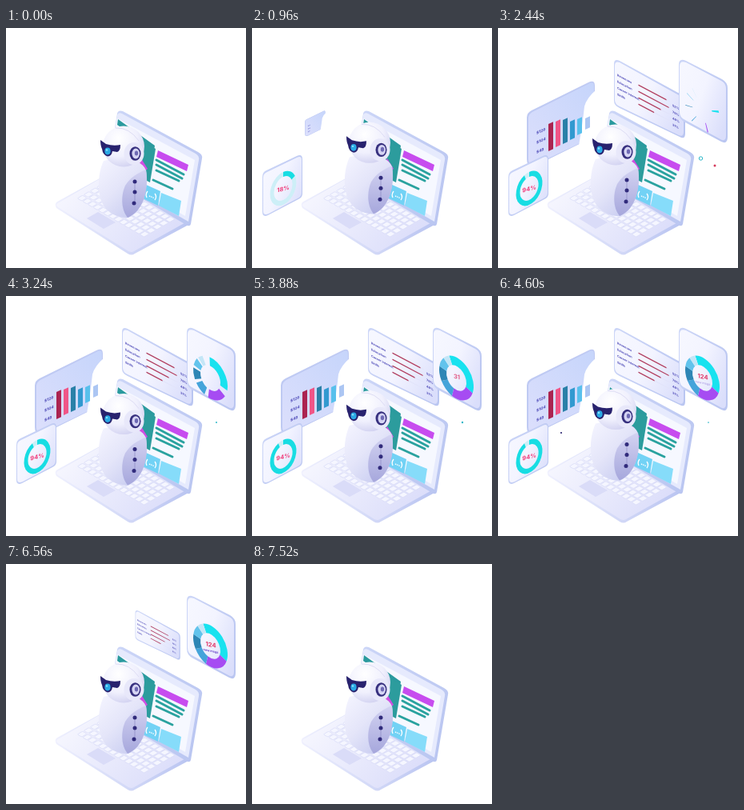
These frames come from a looping animation (300x300 px, 7.84 s). An HTML page:

```html
<!DOCTYPE html>
<html lang="en">
<head>
<meta charset="utf-8">
<title>Robot dashboard</title>
<style>
html, body { margin: 0; width: 100%; height: 100%; overflow: hidden; background: #fff; }
svg { display: block; width: 100vw; height: 100vh; }
text { font-family: Inter, "Open Sans", sans-serif; font-weight: 700; }
</style>
</head>
<body>
<svg viewBox="0 0 300 300" xmlns="http://www.w3.org/2000/svg">
  <defs>
    <linearGradient id="card" x1="0" y1=".2" x2="1" y2=".8">
      <stop offset="0" stop-color="#f6f7ff"/><stop offset=".45" stop-color="#f3f4ff"/><stop offset="1" stop-color="#dadefb"/>
    </linearGradient>
    <linearGradient id="edge" x1="0" y1=".2" x2="1" y2=".8">
      <stop offset="0" stop-color="#cbd5f7"/><stop offset="1" stop-color="#bac6f1"/>
    </linearGradient>
    <linearGradient id="blueCard" x1="0" y1="1" x2="1" y2="0">
      <stop offset="0" stop-color="#dcdffc"/><stop offset="1" stop-color="#c6d5fb"/>
    </linearGradient>
    <linearGradient id="base" x1="0" y1="0" x2="1" y2=".5">
      <stop offset="0" stop-color="#fafaff"/><stop offset="1" stop-color="#dcdefa"/>
    </linearGradient>
    <linearGradient id="under" x1="0" y1="0" x2="1" y2="0">
      <stop offset="0" stop-color="#eff0fe"/><stop offset="1" stop-color="#b9c4f1"/>
    </linearGradient>
    <linearGradient id="body" x1="0" y1="0" x2=".8" y2="1">
      <stop offset="0" stop-color="#f5f5ff"/><stop offset=".5" stop-color="#e4e5f9"/><stop offset="1" stop-color="#c6caf0"/>
    </linearGradient>
    <linearGradient id="wing" x1="0" y1="0" x2="0" y2="1">
      <stop offset="0" stop-color="#d3d3f2"/><stop offset="1" stop-color="#a6a7dc"/>
    </linearGradient>
    <radialGradient id="head" cx=".38" cy=".3" r=".75">
      <stop offset="0" stop-color="#fff"/><stop offset=".6" stop-color="#f0f0fd"/><stop offset="1" stop-color="#d0d0f0"/>
    </radialGradient>
  </defs>

  <g id="laptop">
    <path d="M62 222Q61 218 66 216L130 181L230 240V245L161 282Q157 285 152 282L66 227Q62 225 62 222Z" fill="url(#under)"/>
    <path d="M65 219L130 181L230 240L160 279Q157 281 153 279L65 224Q61 221 65 219Z" fill="url(#base)"/>
    <g id="keys" transform="matrix(6.5 3.75 8 -4.6 88 213)"/>
    <path d="M101 238L115 230L137 243L122 251Z" fill="#dadcf8"/>
    <path d="M139 107Q140 102 146 104L240 155Q246 158 245 163L231 245Q230 249 225 246L126 187Z" fill="url(#edge)"/>
    <path d="M139 109Q140 105 145 107L237 157Q242 160 241 165L228 242L126 184Z" fill="#e6eafd"/>
    <path d="M139 113L236 165L224 235L128 180Z" fill="#f6f8ff"/>
    <path d="M140 114L186 147L185 153L139 121Z" fill="#2a9a9e"/>
    <path d="M160 136L187 151L180 193L155 180Z" fill="#2c9c9d"/>
    <path d="M169 163L177 176L169 182L162 174Z" fill="#cf4ee2"/>
    <path d="M190 153L228 171L226 179L188 161Z" fill="#c74cef"/>
    <path d="M188 165L222 183M188 171L220 188M188 178L216 191M184 190L208 201" stroke="#2aa29f" stroke-width="3" stroke-linecap="round"/>
    <path d="M173 195L193 204L190 222L169 212Z" fill="#72d2f5"/>
    <path d="M194 206L219 216L216 235L191 222Z" fill="#86dcfa"/>
    <path d="M177 204Q174 208 176 212M186 207Q189 211 186 215" fill="none" stroke="#fff" stroke-width="1.3"/>
    <path d="M179 210L185 212.5" stroke="#fff" stroke-width="1.4" stroke-dasharray="1.4 1"/>
  </g>

  <g id="bars">
    <path d="M36 112Q36 106 42 103L113 68Q121 64 121 72V129Q121 136 114 139L49 171Q36 176 36 164Z" fill="#bfcaf3"/>
    <path d="M38 113Q38 108 43 105L113 70Q120 66 120 73V129Q120 135 115 138L50 169Q38 173 38 164Z" fill="url(#blueCard)"/>
    <path d="M123 77Q111 87 108 98Q106 118 101 147H123Z" fill="#fff"/>
    <g id="barShapes"/>
    <g font-size="4.8" fill="#4f4bb8">
      <text transform="matrix(1 -.45 0 1 48 133)">$126</text>
      <text transform="matrix(1 -.45 0 1 48 145)">$104</text>
      <text transform="matrix(1 -.45 0 1 48 157)">$48</text>
    </g>
  </g>

  <g id="list">
    <path d="M145 45Q145 38 152 41L227 82Q234 86 234 93V132Q234 140 227 136L152 100Q145 97 145 91Z" fill="url(#edge)"/>
    <path d="M146 47Q146 41 152 43L226 84Q232 87 232 93V129Q232 137 226 134L152 98Q146 95 146 90Z" fill="url(#card)"/>
    <g id="rows" font-size="3.8" fill="#4f4bb8"/>
  </g>

  <g id="gauge">
    <g id="gaugeCard">
      <path d="M13 186Q13 180 18 178L56 160Q63 157 63 164V207Q63 212 58 214L20 234Q13 237 13 230Z" fill="url(#edge)"/>
      <path d="M14 187Q14 182 19 180L56 162Q62 159 62 165V206Q62 211 57 213L21 232Q14 235 14 229Z" fill="url(#card)"/>
    </g>
    <g id="ring">
      <g transform="matrix(1 -.45 0 1.25 39 200.5)" fill="none" stroke-width="4.8">
        <circle r="14" stroke="#cdeff7"/>
        <path id="gaugeArc" stroke="#18dde3"/>
      </g>
      <text id="percent" transform="matrix(1 -.25 0 1 39 203.5)" text-anchor="middle" font-size="7.4" fill="#f03a78"/>
    </g>
  </g>

  <g id="pie">
    <path d="M226 46Q226 37 235 41L280 64Q287 68 287 75V136Q287 146 279 142L234 118Q226 114 226 106Z" fill="url(#edge)"/>
    <path d="M227 48Q227 40 235 43L279 66Q285 69 285 76V134Q285 143 278 139L234 115Q227 112 227 105Z" fill="url(#card)"/>
    <g id="slices" transform="matrix(1 .5 0 1.2 255.5 102.5)" fill="none" stroke-width="9"/>
    <g text-anchor="middle">
      <text id="count" transform="matrix(1 .18 0 1 256 103.5)" font-size="7.6" fill="#e03868"/>
      <text id="caption" transform="matrix(1 .2 0 1 256 110)" font-size="3.8" fill="#6a45c8">new msgs</text>
    </g>
  </g>

  <g id="robot">
    <path d="M122 166C114 183 114 207 121 220C128 233 142 238 153 237C170 229 178 207 175 178C170 164 146 160 122 166Z" fill="url(#body)"/>
    <path d="M175 177C179 201 172 229 152 237C143 226 144 208 149 197C155 187 165 181 175 177Z" fill="url(#wing)"/>
    <path d="M161 190V220" stroke="#8580bd" stroke-width=".6"/>
    <g fill="#312b7c"><circle cx="161" cy="192" r="2.5"/><circle cx="161" cy="205" r="2.5"/><circle cx="160" cy="219" r="2.5"/></g>
    <ellipse cx="147" cy="148" rx="26" ry="25.5" fill="url(#head)"/>
    <path d="M137 125Q154 124 166 141" fill="none" stroke="#dddcf4" stroke-width="1"/>
    <ellipse cx="160" cy="157" rx="12.5" ry="14" fill="#e8e8fa"/>
    <ellipse cx="161.5" cy="157" rx="7" ry="8.7" fill="#37307f"/>
    <ellipse cx="162.2" cy="157" rx="4.8" ry="6.4" fill="#d5d4f3"/>
    <ellipse cx="163" cy="156.5" rx="2.2" ry="3" fill="#6f6ab5"/>
    <path d="M118 140L125 145Q134 148 143 146Q143 154 139 155L133 154Q132 160 127 160.5Q121 159 120 151Q118 147 118 140Z" fill="#28226e"/>
    <ellipse cx="127" cy="154" rx="3.6" ry="4.4" fill="#2aa9e4"/>
    <circle cx="126" cy="152.5" r="1.2" fill="#8be3fa"/>
  </g>
  <g id="sparks"/>
</svg>
<script>
const LOOP = 7840;
const $ = id => document.getElementById(id);

function add(parent, tag, attrs, text) {
  const node = document.createElementNS('http://www.w3.org/2000/svg', tag);
  for (const key in attrs) node.setAttribute(key, attrs[key]);
  if (text) node.textContent = text;
  return parent.appendChild(node);
}

// Smooth 0..1 progress of t between two times.
function ease(t, from, to) {
  const p = Math.min(1, Math.max(0, (t - from) / (to - from)));
  return (1 - Math.cos(Math.PI * p)) / 2;
}

function arc(r, from, to) {
  const point = deg => {
    const a = deg * Math.PI / 180;
    return `${r * Math.cos(a)} ${r * Math.sin(a)}`;
  };
  return `M${point(from)}A${r} ${r} 0 ${to - from > 180 ? 1 : 0} 1 ${point(to)}`;
}

function zoom(id, cx, cy, s, dy = 0) {
  $(id).setAttribute('transform', `translate(${cx} ${cy + dy}) scale(${s}) translate(${-cx} ${-cy})`);
  $(id).setAttribute('visibility', s > 0.01 ? 'visible' : 'hidden');
}

for (let row = 0; row < 5; row++)
  for (let col = 0; col < 13; col++)
    add($('keys'), 'rect', { x: col + 0.08, y: row + 0.08, width: 0.84, height: 0.82, rx: 0.15, fill: '#f5f6ff', stroke: '#d9dbf7', 'stroke-width': 0.08 });

// x, top, bottom, colour
const bars = [
  [63, 120, 154, '#ab2350'], [72, 117, 149, '#f05587'], [81, 115, 145, '#2a80a8'],
  [90, 117, 140, '#3299d0'], [99, 114, 134, '#58c0ec'], [109, 113, 127, '#acc6f3']
].map(([x, top, bottom, fill]) => ({ x, top, bottom, node: add($('barShapes'), 'path', { fill }) }));

// label, baseline, fill length, value
const rows = [['Revenues', 60, 34, '52%'], ['Education', 68, 37, '76%'], ['Career interest', 76, 27, '48%'], ['Skills', 84, 19, '31%']]
  .map(([label, y, length, value]) => {
    const skew = (x, dy) => `matrix(1 .53 0 1 ${x} ${y + dy})`;
    add($('rows'), 'text', { transform: skew(149, 0) }, label);
    add($('rows'), 'text', { transform: skew(218, 38) }, value);
    const line = { transform: skew(176, 11.5), 'stroke-width': 1.4, 'stroke-linecap': 'round' };
    add($('rows'), 'path', { ...line, d: 'M0 0H38', stroke: '#e2e4fa' });
    return { length, node: add($('rows'), 'path', { ...line, stroke: '#b4405f' }) };
  });

// start angle, end angle, angle it grows from, colour
const slices = [
  [-115, 20, -17, '#18e2ef'], [20, 105, 72, '#a64cf2'], [105, 150, 128, '#45a4da'],
  [150, 190, 170, '#2e86b5'], [190, 222, 206, '#62c3ec'], [222, 245, 234, '#c3e6f7']
].map(([from, to, anchor, stroke]) => ({ from, to, anchor, node: add($('slices'), 'path', { stroke }) }));

// x, y, radius, colour, start, end
const sparks = [
  [245, 148, 1.4, '#b52645', 1400, 2000], [271, 172, 1.5, '#d63a5b', 2140, 2740],
  [263, 158, 1.2, '#2bb7c8', 2900, 4900], [79, 171, 1.1, '#28226e', 4350, 4900],
  [97, 161, 1.3, '#35b9c4', 5650, 6300], [79, 171, 1.5, '#c52d50', 5650, 6300],
  [77, 181, 1.1, '#c52d50', 5700, 6250], [97, 181, 1.4, '#275a96', 5650, 6300],
  [271, 172, 1.3, '#d63a5b', 6900, 7520], [103, 161, 1.2, '#35b9c4', 6900, 7480]
].map(([cx, cy, r, fill, start, end]) => ({ r, start, end, node: add($('sparks'), 'circle', { cx, cy, fill }) }));
const bubble = add($('sparks'), 'circle', { cx: 253.5, cy: 163, fill: 'none', stroke: '#2bb7c8', 'stroke-width': 1 });

function pulse(t, start, end) {
  const p = (t - start) / (end - start);
  return p > 0 && p < 1 ? Math.min(1, 1.6 * Math.sin(Math.PI * p)) : 0;
}

function draw(t) {
  const bob = t < 6000 ? -3.25 * (1 - Math.cos(2 * Math.PI * t / 3000)) : 0;
  $('robot').setAttribute('transform', `translate(0 ${bob})`);

  zoom('gaugeCard', 39, 197, ease(t, 280, 620) * (1 - ease(t, 5660, 5900)));
  zoom('ring', 39, 200.5, ease(t, 400, 740) * (1 - ease(t, 5920, 6200)), 13 * ease(t, 5740, 5960));
  const level = 94 * ease(t, 500, 2110);
  $('gaugeArc').setAttribute('d', arc(14, -90, -90 + 3.6 * level));
  $('percent').textContent = Math.round(level) + '%';

  zoom('bars', 79, 119, ease(t, 850, 1150) * (1 - ease(t, 6080, 6420)));
  bars.forEach(({ x, top, bottom, node }, i) => {
    const h = (bottom - top) * ease(t, 1080 + i * 50, 1400 + i * 50);
    node.setAttribute('d', `M${x} ${bottom}v${-h}l6 -2.8v${h}Z`);
  });

  zoom('list', 190, 89, ease(t, 1460, 1720) * (1 - ease(t, 6420, 6760)));
  rows.forEach(({ length, node }, i) => {
    const w = length * ease(t, 1560 + i * 60, 2340 + i * 60);
    node.setAttribute('d', `M0 0H${w}`);
  });

  zoom('pie', 256, 91, ease(t, 1960, 2280) * (1 - ease(t, 6840, 7200)));
  const open = ease(t, 2250, 3700);
  slices.forEach(({ from, to, anchor, node }) => {
    node.setAttribute('d', arc(17, anchor + (from - anchor) * open, anchor + (to - anchor) * open));
  });
  $('count').textContent = Math.round(124 * ease(t, 3600, 4440));
  $('count').setAttribute('opacity', ease(t, 3600, 4000));
  $('caption').setAttribute('opacity', ease(t, 4300, 5000));

  sparks.forEach(({ r, start, end, node }) => node.setAttribute('r', r * pulse(t, start, end)));
  const size = pulse(t, 2140, 2760);
  bubble.setAttribute('r', 2.2 * size);
  bubble.setAttribute('visibility', size ? 'visible' : 'hidden');
}

const origin = performance.now();
function tick() {
  draw((performance.now() - origin) % LOOP);
  requestAnimationFrame(tick);
}
tick();
</script>
</body>
</html>
```
